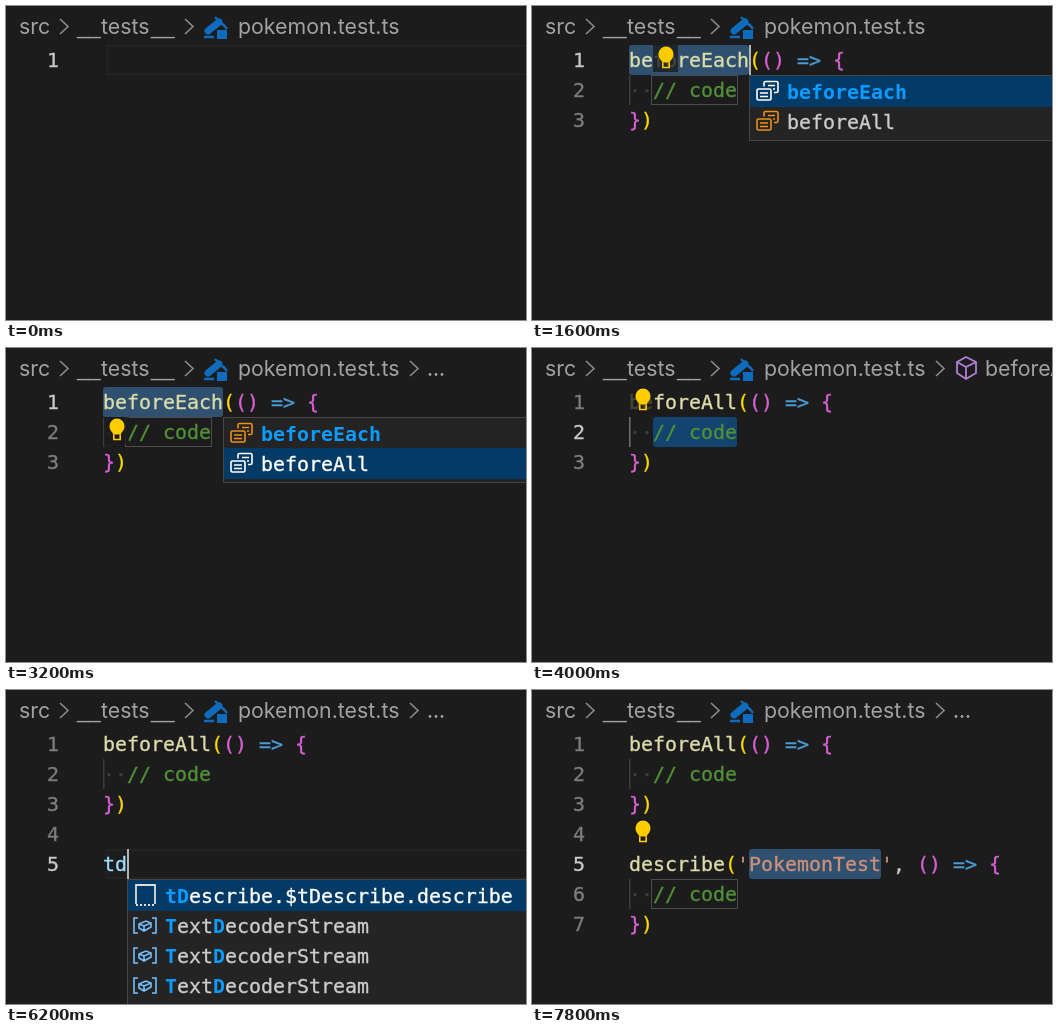
Recreate the animation shown at these times as an HTML page. Size 520 by 314 pixels, loop 8 s.

```html
<!DOCTYPE html>
<html lang="en">
<head>
<meta charset="utf-8">
<title>Editor snippets</title>
<style>
html, body { margin: 0; width: 100%; height: 100%; overflow: hidden; background: #1c1c1c; }
svg { display: block; width: 520px; height: 314px; }
.code { font: 19.93px "DejaVu Sans Mono", monospace; stroke-width: .35; }
.crumbs { font: 21.35px Inter, sans-serif; fill: #a2a2a2; }
.under { font-family: "Liberation Sans", Arial, sans-serif; }
.match { font-weight: bold; fill: #0c9bff; stroke: none; }
</style>
</head>
<body>
<svg id="stage" viewBox="0 0 520 314"></svg>
<script>
const LOOP = 8000, LEFT = 97, CHAR = 12, LINE = 30;
const stage = document.getElementById('stage');
const colX = col => LEFT + col * CHAR;
const baseline = line => 31 + line * LINE;
const lineTop = line => 9 + line * LINE;

const text = (x, y, markup, fill, extra = '') =>
  `<text x="${x}" y="${y}" fill="${fill}" stroke="${fill}" ${extra}>${markup}</text>`;
const rect = (x, y, w, h, fill, extra = '') =>
  `<rect x="${x}" y="${y}" width="${w}" height="${h}" fill="${fill}" ${extra}/>`;
const outline = (x, y, w, h, color, width = 1) =>
  rect(x, y, w, h, 'none', `stroke="${color}" stroke-width="${width}"`);
const path = (d, stroke, width = 1.6, extra = '') =>
  `<path d="${d}" fill="none" stroke="${stroke}" stroke-width="${width}" ${extra}/>`;
const move = (x, y, body) => `<g transform="translate(${x} ${y})">${body}</g>`;

// Breadcrumb bar
function breadcrumbs(symbol) {
  const chevron = x => path(`M${x} 13l8 7.5-8 7.5`, '#8c8c8c');
  const label = (x, s, cls = '') => `<text x="${x}" y="28" class="${cls}">${s}</text>`;
  let out = label(13, 'src') + chevron(54) +
    label(71, '__', 'under') + label(95, 'tests') + label(145, '__', 'under') + chevron(179) +
    path('M202 25L213 16', '#0f6cbd', 7, 'stroke-linecap="round"') +
    path('M209 11l9 9M198 31h10M217 18l4 5', '#0f6cbd', 2.4) +
    rect(211, 24, 10, 9, '#0f6cbd') + label(232, 'pokemon.test.ts');
  if (symbol) out += chevron(404);
  if (symbol === '…') {
    out += [424, 430, 436].map(x => `<circle cx="${x}" cy="26.5" r="1.4"/>`).join('');
  } else if (symbol) {
    out += path('M434 9l10 5v11l-10 6-9-6V14zM425 14l9 5 10-5M434 19v12', '#b180d7', 1.8) + label(453, symbol);
  }
  return `<g class="crumbs">${out}</g>`;
}

// Syntax colouring with nested bracket colours
function codeLines(lines) {
  const pairs = ['#ffd700', '#da60d6'];
  let depth = 0;
  return lines.map((line, i) => {
    let out = '';
    for (const m of line.matchAll(/\/\/.*|'[^']*'|=>|\w+|[(){},]/g)) {
      const s = m[0];
      let fill = '#cccccc';
      if (s.startsWith('//')) fill = '#519039';
      else if (s[0] === "'") fill = '#ce9178';
      else if (s === '=>') fill = '#4a9cd6';
      else if (/[({]/.test(s)) fill = pairs[depth++ % 2];
      else if (/[)}]/.test(s)) fill = pairs[--depth % 2];
      else if (/\w/.test(s)) fill = line[m.index + s.length] === '(' ? '#dcdcaa' : '#9cdcfe';
      out += text(colX(m.index), baseline(i + 1), s.replace('>', '&gt;'), fill);
    }
    if (line.startsWith('  ')) out += text(LEFT, baseline(i + 1), '··', '#3c3c3c');
    return out;
  }).join('');
}

function bulb([x, y]) {
  return rect(x - 13, y - 12, 25, 27, '#1c1c1c', 'opacity=".78"') +
    move(x, y, '<path fill="#fc0" d="M-4 5.5C-4 3-7.5 2-7.5-3a7.5 7.5 0 0 1 15 0C7.500 2 4 3 4 5.500z"/>' +
      path('M-3.2 5.500v5h6.400v-5', '#fc0'));
}

// Suggestion list
const icons = {
  choice: on => {
    const c = on ? '#fff' : '#ee8f18';
    return path('M8 9.5V6q0-1.500 1.500-1.500h11q1.500 0 1.500 1.500v8q0 1.500-1.500 1.500H18', c) +
      path('M2.500 12h11q1.500 0 1.500 1.500v8q0 1.500-1.500 1.500h-11Q1 23 1 21.500v-8Q1 12 2.500 12z', c) +
      path('M4 16h8M4 19.500h8M12 8.500h7M17 12h2', c);
  },
  snippet: () => path('M2 23V4h19v19', '#ddd', 1.8) + path('M2 24h20', '#ddd', 2, 'stroke-dasharray="2 2"'),
  variable: () => path('M4 7H0v15h4M18 7h4v15h-4M5 13l7-3 5 2v4l-7 4-5-3zM5 13l5 2 7-3M10 15v5', '#75beff')
};

function highlight(s, pattern) {
  let k = 0;
  return [...s].map(ch => {
    if (k < pattern.length && ch.toLowerCase() === pattern[k].toLowerCase()) {
      k++;
      return `<tspan class="match">${ch}</tspan>`;
    }
    return ch;
  }).join('');
}

function popup({ col, line, rows, selected = 0 }) {
  const x = colX(col) + 1, top = lineTop(line + 1) + 2, width = 520;
  let out = rect(x, top - 1, width, rows.length * LINE + 5, '#242425') +
    outline(x - .5, top - 1.5, width, rows.length * LINE + 5, '#454545') +
    rect(x, top + selected * LINE - 1, width, LINE + 1, '#043b66');
  rows.forEach(([icon, label, pattern], i) => {
    const y = top + i * LINE, on = i === selected;
    out += move(x + 6, y, icons[icon](on)) + text(x + 37, y + 22, highlight(label, pattern), on ? '#fff' : '#ccc');
  });
  return out;
}

function render(s) {
  let out = rect(0, 0, 520, 314, '#1c1c1c') + breadcrumbs(s.symbol);
  if (s.current) out += outline(101.5, lineTop(s.current) + 1, 430, 28, '#232323', 2);
  if (s.select) {
    const [col, line, count, fill] = s.select;
    out += rect(colX(col), lineTop(line), count * CHAR, LINE, fill, 'rx="3"');
  }
  s.lines.forEach((line, i) => {
    const n = i + 1, active = s.active === n;
    if (line.startsWith('  ')) out += rect(LEFT, lineTop(n), 1.5, LINE, active ? '#707070' : '#3c3c3c');
    if (s.stop === n) out += outline(119.5, lineTop(n) + .5, 86, 29, '#4c4c4c');
    out += text(53, baseline(n), n, active ? '#c9c9c9' : '#7d7d7d', 'text-anchor="end"');
  });
  out += codeLines(s.lines);
  if (s.bulb) out += bulb(s.bulb);
  if (s.popup) out += popup(s.popup);
  if (s.cursor) out += rect(colX(s.cursor[0]), lineTop(s.cursor[1]), 2, LINE, '#b4b5b3');
  stage.innerHTML = `<g class="code">${out}</g>`;
}

// Story
const block = head => [head + '() => {', '  // code', '})'];
const each = block('beforeEach('), all = block('beforeAll(');
const gap = [...all, ''];
const variables = (names, pattern) => names.map(name => ['variable', name, pattern]);

const typing = (word, before, suggest) => n => {
  const q = word.slice(0, n), line = before.length + 1;
  return {
    lines: [...before, q], cursor: [n, line],
    popup: n > 1 ? { col: n, line, rows: suggest(q) } : null
  };
};
const typeBefore = typing('tbef', [], q => [
  ['snippet', 'tBefore.$tBefore.beforeEach', q],
  ...variables(['HTMLTableElement', 'HTMLTableCellElement', 'HTMLTableColElement', 'HTMLTableRowElement',
    'HTMLButtonElement', 'HTMLBaseElement', 'HTMLBodyElement'], q)
]);
const typeDescribe = typing('tdes', gap, q => [
  ['snippet', 'tDescribe.$tDescribe.describe', q],
  ...variables(Array(4).fill('TextDecoderStream'), q === 'tdes' ? 'teds' : q)
]);
const choice = selected => ({
  col: 10, line: 1, selected,
  rows: [['choice', 'beforeEach', 'beforeEach'], ['choice', 'beforeAll', '']]
});
const SOFT = '#2f506f', STRONG = '#12446d';

const start = {
  lines: [''], active: 1, current: 1, symbol: '', select: null,
  stop: 0, bulb: null, cursor: null, popup: null
};
const timeline = [
  [0, {}],
  [400, typeBefore(1)],
  [600, typeBefore(2)],
  [800, typeBefore(3)],
  [1000, typeBefore(4)],
  [1600, {
    lines: each, current: 0, select: [0, 1, 10, SOFT], stop: 2,
    bulb: [134, 51], cursor: [10, 1], popup: choice(0)
  }],
  [1800, { bulb: null }],
  [2000, { symbol: '…', cursor: null }],
  [2200, { bulb: [111, 81] }],
  [2600, { cursor: [10, 1] }],
  [3000, { popup: choice(1) }],
  [3200, { cursor: null }],
  [3600, { lines: all, active: 2, select: [2, 2, 7, STRONG], stop: 0, bulb: null, popup: null }],
  [3800, { symbol: 'beforeAll() callback' }],
  [4000, { bulb: [111, 51] }],
  [4400, { active: 3, current: 3, select: null, bulb: null, cursor: [2, 3], symbol: '…' }],
  [4600, { lines: gap, active: 4, current: 4, cursor: [0, 4] }],
  [4800, { lines: [...gap, ''], active: 5, current: 5, cursor: [0, 5] }],
  [5400, { cursor: null }],
  [6000, typeDescribe(1)],
  [6200, typeDescribe(2)],
  [6400, typeDescribe(3)],
  [6600, { ...typeDescribe(4), bulb: [111, 141] }],
  [7000, { popup: null }],
  [7200, {
    lines: [...gap, ...block("describe('PokemonTest', ")], current: 0,
    select: [10, 5, 11, SOFT], stop: 6, cursor: [21, 5]
  }],
  [7600, { cursor: null }]
];
let state = start;
const scenes = timeline.map(([time, patch]) => ({ time, state: state = { ...state, ...patch } }));

let shown = null;
function tick() {
  const t = performance.now() % LOOP;
  const scene = scenes.filter(s => s.time <= t).pop();
  if (scene !== shown) render((shown = scene).state);
  requestAnimationFrame(tick);
}
tick();
</script>
</body>
</html>
```
